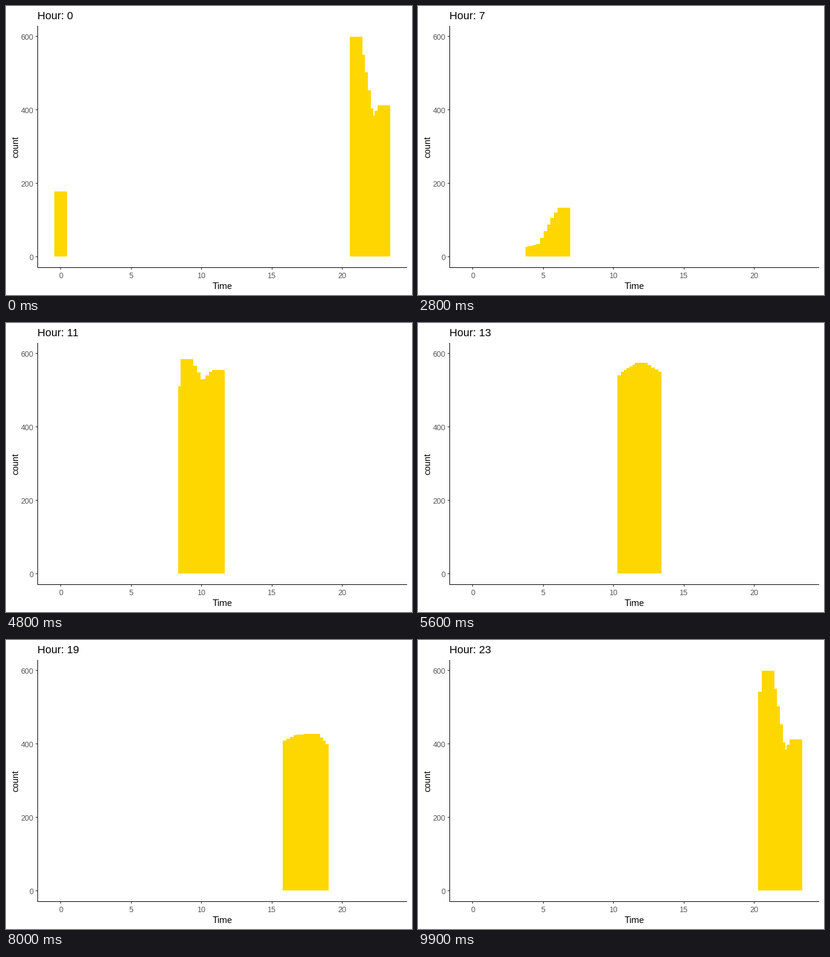
A matplotlib script for the animation above (10 s loop, 672x480 px).

```python
import math

import matplotlib.pyplot as plt
import numpy as np
from matplotlib.animation import FuncAnimation
from matplotlib.patches import Rectangle

W, H, DPI = 672, 480, 96
FRAMES, INTERVAL = 100, 100
WAKE = 10
BAR_W = 0.9
X0, X_UNIT = 90.67, 23.292
Y0, Y_UNIT = 416.2, 0.6095
GOLD, TICK, LABEL = "#FFD700", "#333333", "#4D4D4D"

COUNTS = [178, 98, 58, 35, 24, 34, 106, 161, 217, 585, 510, 550,
          574.5, 550, 307, 274, 404, 424, 427, 380, 371, 599, 356, 412]
LAST = len(COUNTS) - 1
KEYS = [round(h * (FRAMES - 1) / LAST) for h in range(LAST + 1)]

plt.rcParams.update({
    "font.family": "Liberation Sans",
    "text.hinting": "native",
    "text.hinting_factor": 1,
})

fig = plt.figure(figsize=(W / DPI, H / DPI), dpi=DPI, facecolor="white")
ax = fig.add_axes([0, 0, 1, 1])
ax.set_xlim(0, W)
ax.set_ylim(H, 0)
ax.axis("off")


def px(hour):
    return math.floor(X0 + hour * X_UNIT)


def py(count):
    return round(Y0 - count * Y_UNIT)


def box(x, y, w, h, color):
    patch = Rectangle((x, y), w, h, facecolor=color, linewidth=0,
                      antialiased=False)
    return ax.add_patch(patch)


def label(x, y, text, size, color="black", **kw):
    return ax.text(x, y, text, fontsize=size * 72 / DPI, color=color,
                   va="baseline", **kw)


bars = [box(0, 0, 0, 0, GOLD) for _ in range(WAKE + 1)]

for count in range(0, 601, 200):
    y = math.floor(Y0 - count * Y_UNIT)
    box(49, y, 3, 1, TICK)
    label(45.5, y + 6, str(count), 12, LABEL, ha="right")
for hour in range(0, 21, 5):
    box(px(hour), 435, 1, 3, TICK)
    label(X0 + hour * X_UNIT, 452, str(hour), 12, LABEL, ha="center")

box(52, 33, 1, 402, "black")
box(52, 434, 612, 1, "black")
label(358, 470, "Time", 15, ha="center")
label(20, 233.5, "count", 15, ha="center", rotation=90,
      rotation_mode="anchor")
title = label(52, 22, "", 18, ha="left")


def update(frame):
    # The current bar plus its wake, which wraps around the loop.
    for back, bar in enumerate(bars):
        step = (frame - back) % FRAMES
        hour = np.interp(step, KEYS, range(LAST + 1))
        count = np.interp(step, KEYS, COUNTS)
        left, right = px(hour - BAR_W / 2), px(hour + BAR_W / 2)
        top = py(count)
        bar.set_bounds(left, top, right - left, py(0) - top)
    title.set_text(f"Hour: {round(frame * LAST / (FRAMES - 1))}")
    return [*bars, title]


anim = FuncAnimation(fig, update, frames=FRAMES, interval=INTERVAL,
                     repeat=True, repeat_delay=0, blit=False)
plt.show()
```
